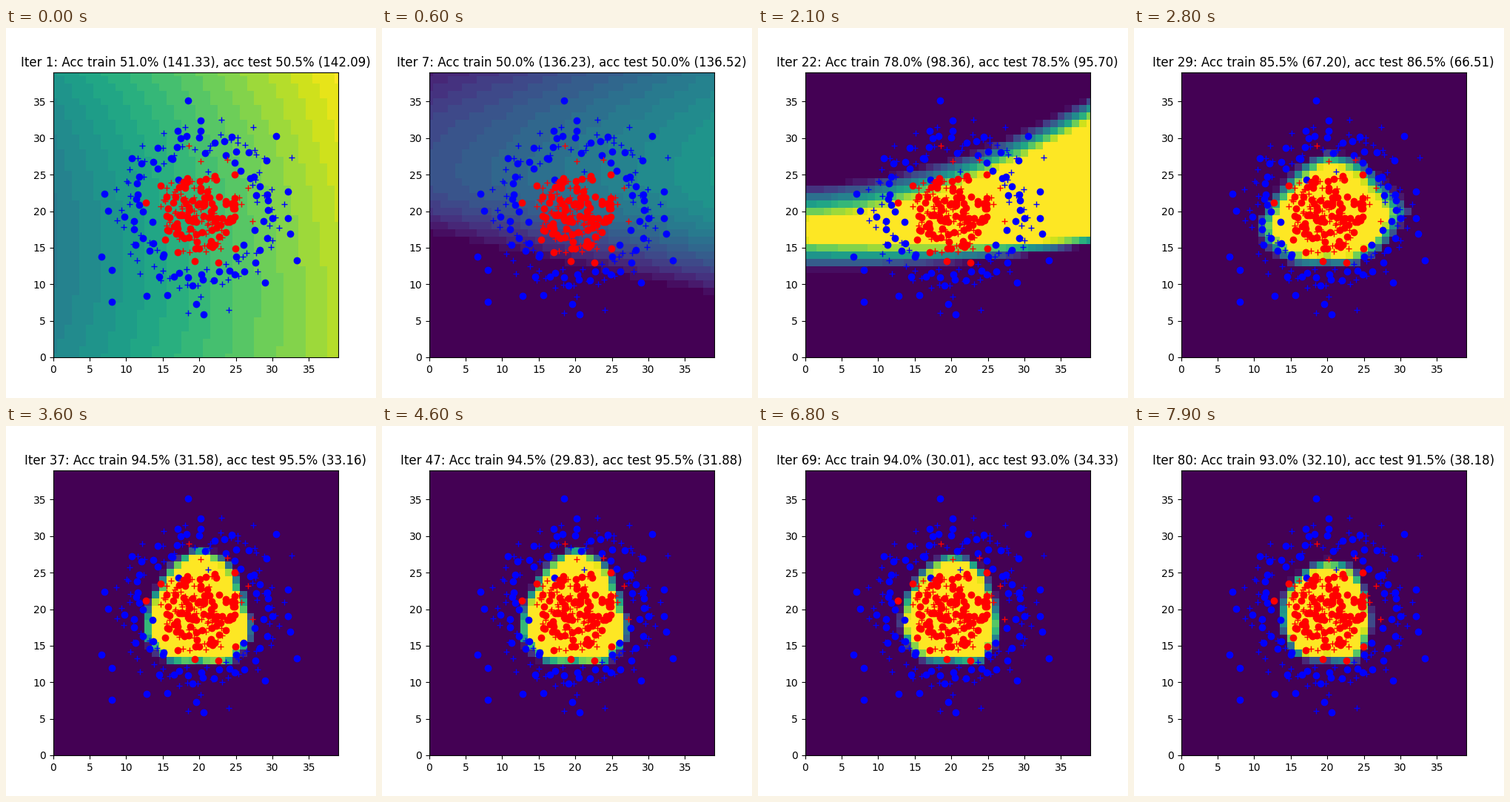
Recreate the animation shown at these times as a matplotlib script. Size 500 by 500 pixels, loop 8000 ms.

```python
import numpy as np
import matplotlib.pyplot as plt
from matplotlib.animation import FuncAnimation

N = 39
FRAMES = 80

x, y = np.meshgrid(np.arange(N + 1.0), np.arange(N + 1.0))
u, w = x / N, y / N


def slope():
    return 0.42 + 0.45 * u + 0.1 * u * w**2 + 0.3 * (w - 0.4)**2 * (1 - u)


def ridge():
    base = 16.5 - 8.5 * u
    peak, top = 0.26 + 0.28 * u, 0.1 + 0.33 * u
    s = (y - base) / (25 - base)
    up = peak * np.where(s > 0, 1 - (1 - s)**2, 2 * s)
    down = peak - (peak - top) * ((y - 25) / 14)**2
    return np.where(y < 25, up, down)


def band():
    rise = (y - 12.3) / (4.5 - 1.5 * u)
    fall = (26.8 + 6.4 * u**2 - y) / 7
    floor = 0.34 * (1 - y / (2.8 + 1.5 * u))
    return np.maximum(np.minimum(rise, fall), floor)


def wedge():
    rise = (y - 11.7 - 3.6 * u**2) / (4.5 - 3.2 * u)
    fall = (23.8 + 12 * u**1.8 - y) / (5 - 1.5 * u)
    return np.minimum(rise, fall)


def blob(radii):
    """Closed shape around (20, 20), one radius every 30 degrees."""
    angle = np.degrees(np.arctan2(y - 20, x - 20))
    edge = np.interp(angle, np.arange(0, 360, 30), radii, period=360)
    return (edge - np.hypot(x - 20, y - 20)) / 1.3 + 0.5


drop = blob([6.3, 6, 7.2, 8.1, 6.9, 6.1, 6.8, 8.1, 8, 7.1, 8.2, 7.8])
disc = blob([5.5, 5.4, 6.3, 6.4, 5.8, 5.8, 6, 6.5, 7.3, 6.6, 7.7, 6.3])
FIELDS = [slope(), ridge(), band(), wedge(), drop, drop, disc]
STEPS = [1, 7, 15, 22, 37, 58, 80]
TRAIN_ACC = [51, 50, 80.5, 78, 94.5, 94.5, 93]
TRAIN_LOSS = [141.33, 136.23, 106.58, 98.36, 31.58, 27.91, 32.10]
TEST_ACC = [50.5, 50, 80.5, 78.5, 95.5, 95, 91.5]
TEST_LOSS = [142.09, 136.52, 105.31, 95.70, 33.16, 30.48, 38.18]


def field(step):
    k = min(np.searchsorted(STEPS, step, side="right") - 1, len(STEPS) - 2)
    f = (step - STEPS[k]) / (STEPS[k + 1] - STEPS[k])
    return np.clip((1 - f) * FIELDS[k] + f * FIELDS[k + 1], 0, 1)


def caption(step):
    def at(values):
        return np.interp(step, STEPS, values)

    def acc(values):
        return round(at(values) * 2) / 2

    return (f"Iter {step}: Acc train {acc(TRAIN_ACC):.1f}% ({at(TRAIN_LOSS):.2f}), "
            f"acc test {acc(TEST_ACC):.1f}% ({at(TEST_LOSS):.2f})")


rng = np.random.default_rng(7)


def ring(count, inner, outer):
    """Points spread evenly by angle, with a random radius."""
    a = (np.arange(count) + rng.uniform(-0.6, 0.6, count)) * 2 * np.pi / count
    r = rng.uniform(inner, outer, count)
    return 20 + r * np.cos(a), 20 + r * np.sin(a)


def core(count, width, height):
    a = rng.uniform(0, 2 * np.pi, count)
    r = rng.uniform(0, 1, count)**0.6
    return 20.2 + width * r * np.cos(a), 19.8 + height * r * np.sin(a)


def dots(cloud, extra, style):
    ax.plot(*np.hstack([cloud, np.transpose(extra)]), style)


fig, ax = plt.subplots(figsize=(5, 5), dpi=100)
image = ax.imshow(field(1), origin="lower", cmap=plt.get_cmap("viridis", 28),
                  vmin=0, vmax=1, interpolation="nearest")

dots(ring(60, 7.6, 10.6),
     [(18.5, 35.1), (20.2, 32.4), (17, 31), (20.2, 31), (24.4, 30.2),
      (30.5, 30.3), (6.6, 13.8), (7, 22.4), (7.5, 20.1), (8, 12),
      (8, 7.6), (12.8, 8.4), (15.6, 8.5), (20.6, 5.9), (19.6, 7.3),
      (29, 10.2), (33.4, 13.3), (32.1, 19), (32.4, 16.9), (32.1, 22.7),
      (29.2, 26.9), (10.8, 27.2), (13.6, 18.5), (17.1, 24.3)], "bo")
dots(core(92, 5.3, 5.4),
     [(12.7, 21.2), (14.7, 23.5), (17, 14.4), (19.4, 13.2), (22.6, 13),
      (24.9, 14.9), (24.8, 25), (15.3, 16.1)], "ro")
dots(ring(74, 7.8, 12),
     [(18.5, 6.1), (24, 6.5), (23, 32.5), (27.4, 31.5), (32.6, 27.4), (21.2, 25.4)], "b+")
dots(core(70, 6, 5.8),
     [(18.6, 29), (20.2, 26.8), (23.8, 27), (26.7, 23.2), (27.3, 18.6)], "r+")

ax.set(xlim=(0, N), ylim=(0, N), xticks=range(0, N, 5), yticks=range(0, N, 5))
title = ax.set_title(caption(1))


def update(i):
    image.set_data(field(i + 1))
    title.set_text(caption(i + 1))
    return image, title


anim = FuncAnimation(fig, update, frames=FRAMES, interval=100, repeat=True)
plt.show()
```
